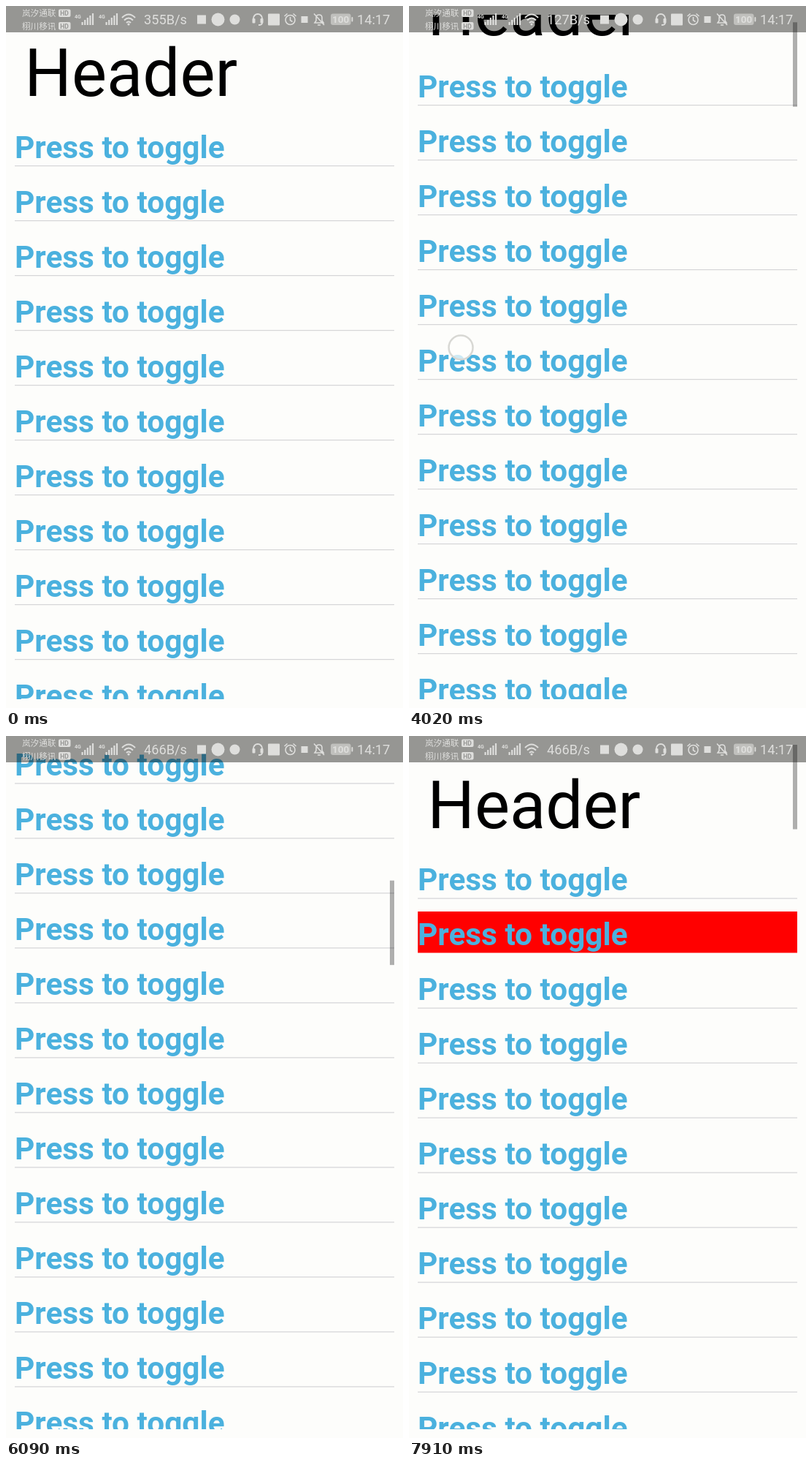
An HTML page with a canvas for the animation above (8000 ms loop, 544 by 960 pixels).

```html
<!DOCTYPE html>
<html lang="en">
<head>
<meta charset="utf-8">
<title>Press to toggle list</title>
<style>
  html, body { margin: 0; height: 100%; overflow: hidden; background: #fdfdfb; }
  canvas { display: block; width: 100vw; height: 100vh; }
</style>
</head>
<body>
<canvas id="stage" width="544" height="960"></canvas>
<script>
const ctx = document.getElementById('stage').getContext('2d');
const LOOP = 8000, STEP = 121.7;
const ROW = 75, FIRST_LINE = 218, ROWS = 100;
const VIEW = { x: 12, y: 12, w: 520, h: 936 };
const PAPER = '#fdfdfb', BLUE = '#4bb1de', RULE = '#d6d6d8', ICON = '#dededc', SHADE = '#979795';

const linear = u => u;
const easeIn = u => u ** 1.6;
const easeOut = u => 1 - (1 - u) ** 2;
const coast = u => 1 - (1 - u) ** 1.3;
const smooth = u => u * u * (3 - 2 * u);

// [time, value, easing into this key]
const scrollKeys = [
  [3350, 0], [4016, 83, smooth], [4520, 0, smooth], [5040, 0, linear],
  [5280, 350, easeIn], [6080, 1503.8, easeOut], [6280, 1503.8, linear],
  [6620, 1151, easeIn], [6693, 1012.7, linear], [7400, 0, coast],
  [7450, -48, easeOut], [8080, 0, easeOut]
];

// Each gesture: [time, x, y]
const touches = [
  [[3300, 66, 562], [4016, 71, 467], [4520, 82, 562]],
  [[4940, 95, 613], [5040, 95, 613], [5280, 128, 250]],
  [[6250, 122, 200], [6620, 130, 553]]
];

function sample(keys, t, column = 1) {
  if (t <= keys[0][0]) return keys[0][column];
  const i = keys.findIndex(k => k[0] > t);
  if (i < 0) return keys[keys.length - 1][column];
  const a = keys[i - 1], b = keys[i];
  const ease = typeof b[2] === 'function' ? b[2] : smooth;
  return a[column] + (b[column] - a[column]) * ease((t - a[0]) / (b[0] - a[0]));
}

function text(str, x, y, font, color) {
  ctx.font = font;
  ctx.fillStyle = color;
  ctx.fillText(str, x, y);
}

function rect(x, y, w, h, color, radius = 0) {
  ctx.fillStyle = color;
  ctx.beginPath();
  ctx.roundRect(x, y, w, h, radius);
  ctx.fill();
}

function disc(x, y, r, color = ICON) {
  ctx.fillStyle = color;
  ctx.beginPath();
  ctx.arc(x, y, r, 0, Math.PI * 2);
  ctx.fill();
}

function stroke(path, width = 1.6, color = ICON) {
  ctx.strokeStyle = color;
  ctx.lineWidth = width;
  ctx.stroke(new Path2D(path));
}

function drawList(t, scroll) {
  ctx.save();
  ctx.beginPath();
  ctx.rect(VIEW.x, VIEW.y, VIEW.w, VIEW.h);
  ctx.clip();
  text('Header', 25.3, 122.5 - scroll, '90.67px Roboto, sans-serif', '#000');

  const first = Math.max(0, Math.floor((scroll - FIRST_LINE) / ROW));
  for (let i = first; i < Math.min(first + 16, ROWS); i++) {
    const line = FIRST_LINE + i * ROW - scroll;
    const toggled = i === 1 && t > 5800;
    if (toggled) rect(12, line - 56.5, 520, 56.5, '#f00');
    text('Press to toggle', 12, line - 10.4, 'bold 42.33px Roboto, sans-serif', BLUE);
    if (!toggled) rect(12, line, 520, 1.3, RULE);
  }

  if (t > 3350) rect(526, 12 + Math.max(scroll, 0) / 8.1, 6, 115.5, 'rgba(0,0,0,.31)');
  ctx.restore();
}

function drawTouch(t) {
  const path = touches.find(p => t >= p[0][0] && t <= p[p.length - 1][0]);
  if (!path) return;
  const x = sample(path, t, 1), y = sample(path, t, 2);
  disc(x, y, 17, 'rgba(255,255,253,.72)');
  ctx.strokeStyle = '#d8d8d4';
  ctx.lineWidth = 2.5;
  ctx.beginPath();
  ctx.arc(x, y, 16.5, 0, Math.PI * 2);
  ctx.stroke();
}

function drawSignal(x) {
  text('4G', x, 17, 'bold 7px Roboto, sans-serif', ICON);
  for (let i = 0; i < 5; i++) {
    const h = 4 + i * 3;
    rect(x + 9.5 + i * 3.6, 26 - h, 2.2, h, ICON);
  }
}

function drawStatusBar(t) {
  ctx.globalCompositeOperation = 'multiply';
  rect(0, 0, 544, 36, SHADE);
  ctx.globalCompositeOperation = 'source-over';

  ['岚汐通联', '栩川移讯'].forEach((carrier, i) => {
    const y = 14 + i * 17.5;
    text(carrier, 22, y, '11.6px "Noto Sans CJK SC", "Noto Sans CJK", sans-serif', ICON);
    rect(72, y - 9.5, 16.5, 10.5, ICON, 2);
    text('HD', 74.3, y - 1, 'bold 8.5px Roboto, sans-serif', SHADE);
  });
  drawSignal(94);
  drawSignal(127);

  // Wi-Fi
  stroke('M159 16 Q168 7 177 16 M162 19.5 Q168 13.5 174 19.5 M165 23 Q168 20 171 23', 2);
  disc(168, 25, 1.6);

  const speed = t < 1300 ? '355B/s' : t < 4700 ? '127B/s' : '466B/s';
  text(speed, 189, 25, '18.2px Roboto, sans-serif', ICON);

  rect(262, 12.5, 12, 12, ICON);
  disc(290.5, 18.5, 9);
  disc(313.5, 18.5, 7);

  // Headset
  stroke('M339 22 V17 A6 6 0 0 1 351 17 V23 Q351 26 346 26', 1.8);
  rect(337.5, 17, 4, 6.5, ICON, 1);
  rect(348.5, 17, 4, 6.5, ICON, 1);

  rect(359, 10.5, 16, 16, ICON, 1);

  // Alarm
  stroke('M383 19 a6.5 6.5 0 1 0 13 0 a6.5 6.5 0 1 0 -13 0 M389.5 15 V19.5 L392.5 21.5 M381.5 14 L385.5 10.5 M393.5 10.5 L397.5 14');

  rect(404.5, 14, 9, 9, ICON);

  // Muted bell
  stroke('M423 23 H435 L433 20 V16 Q433 12 429 12 Q425 12 425 16 V20 Z M427 26 H431 M422 10.5 L436 26');

  // Battery
  rect(445, 10.5, 27.5, 15.5, 'rgba(255,255,253,.4)', 3);
  rect(473.5, 15, 1.8, 6.5, ICON, 1);
  text('100', 447, 23, 'bold 13.5px Roboto, sans-serif', ICON);

  text('14:17', 481, 25, '18.2px Roboto, sans-serif', ICON);
}

function frame() {
  // The screen updates in held steps rather than continuously.
  const t = Math.floor((performance.now() % LOOP + 5) / STEP) * STEP;
  rect(0, 0, 544, 960, PAPER);
  drawList(t, sample(scrollKeys, t));
  drawTouch(t);
  drawStatusBar(t);
  requestAnimationFrame(frame);
}
frame();
</script>
</body>
</html>
```
